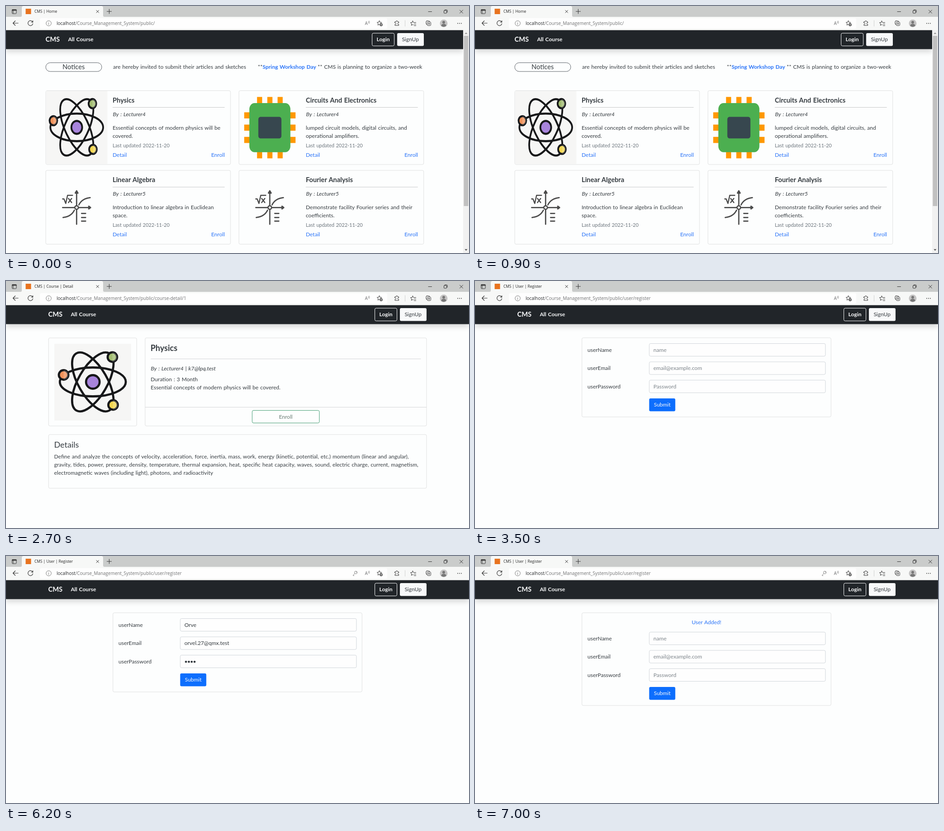
These frames come from a looping animation (1025x547 px, 8000 ms). An HTML page:

```html
<!DOCTYPE html>
<html lang="en">
<head>
<meta charset="utf-8">
<title>CMS</title>
<style>
html, body { margin: 0; height: 100%; overflow: hidden; background: #fdfefe; }
svg { display: block; width: 100%; height: 100%; }
text { font: 12.07px Lato, "Open Sans", sans-serif; word-spacing: .8px; fill: #363c41; white-space: pre; }
.ui { font: 9.95px "Open Sans", "Noto Sans", sans-serif; word-spacing: 0; fill: #6f7071; }
.tab { font-size: 8.4px; fill: #222; }
.b { font-weight: 700; }
.i { font-style: italic; font-size: 12.4px; }
.h { font-size: 14.7px; }
.big { font-size: 18px; }
.small { font-size: 11px; fill: #6c757d; }
.mute { fill: #7d848a; }
.link { fill: #2a74f8; }
.white { fill: #f8f9fa; }
.green { fill: #6a7d75; }
.mid { text-anchor: middle; }
.end { text-anchor: end; }
.line { fill: none; stroke: var(--ink, #333); stroke-linecap: round; stroke-linejoin: round; }
.card { fill: #fdfefe; stroke: #dfe0e0; }
.field { fill: #fefefe; stroke: #d0d5da; }
.rule { stroke: #c6c7c8; }
.nav { fill: #212529; filter: drop-shadow(0 6px 6px rgba(0,0,0,.15)); }
</style>
</head>
<body>
<svg id="stage" viewBox="0 0 1025 547"></svg>
<script>
const text = (x, y, s, cls = '') => `<text x="${x}" y="${y}" class="${cls}">${s}</text>`;
const box = (x, y, w, h, attrs = '') => `<rect x="${x}" y="${y}" width="${w}" height="${h}" ${attrs}/>`;
const card = (x, y, w, h) => box(x, y, w, h, 'rx="3" class="card"');
const path = (d, attrs = '') => `<path d="${d}" class="line" ${attrs}/>`;
const dot = (x, y, r, attrs = '') => `<circle cx="${x}" cy="${y}" r="${r}" ${attrs}/>`;
const group = (transform, s) => `<g transform="${transform}">${s}</g>`;

// Drawn in a 170 x 170 square
function atom() {
  const orbit = a => `<ellipse rx="73" ry="32" transform="translate(85.2 84.5) rotate(${a})"/>`;
  const ball = (x, y, r, c) => dot(x, y, r, `fill="${c}"`) +
    `<path d="M${x} ${y - r}a${r} ${r} 0 0 1 0 ${2 * r}z" fill="#fff" fill-opacity=".2" stroke="none"/>`;
  return box(0, 0, 170, 170, 'fill="#f6f6f5"') +
    `<g fill="none" stroke="#17181a" stroke-width="4.8">${[0, 60, -60].map(orbit).join('')}
    ${dot(85.2, 84.5, 15, 'fill="#a884dc"')}${ball(128.5, 29.5, 10.5, '#a3bd72')}
    ${ball(20.5, 69, 10.5, '#f0925a')}${ball(130, 135.5, 10.5, '#f2d650')}</g>`;
}

// Drawn in a 48 x 48 square
function chip() {
  const pins = [14, 22, 30].map(p => box(p, 4, 4, 40) + box(4, p, 40, 4)).join('');
  return `<g fill="#ff9800">${pins}</g>` + box(8, 8, 32, 32, 'rx="4" fill="#4caf50"') +
    box(15, 17, 18, 14, 'rx="1.6" fill="#37474f"');
}

// Origin at the crossing of the axes
function graph() {
  return '<g stroke-width="2.8" style="--ink:#4c4c4c">' +
    path('M0 37V-34M-31 0H28M5 -6Q12 -20 30 -22M-30 22Q-12 20 -5 6') +
    path('M-3 -32L0 -37L3 -32zM27 -3L31 0L27 3z') +
    path('M-31 -19H-28L-24 -9L-20 -27H-9M-18 -20L-11 -11M-11 -20L-18 -11', 'stroke-width="2.5"') +
    path('M11 13H20M11 22H20M11 30H20') + dot(0, 0, 4, 'class="line" style="fill:#fdfefe"') + '</g>';
}

function star(x, y, extra) {
  let d = '';
  for (let k = 0; k < 10; k++) {
    const a = k * Math.PI / 5, r = k % 2 ? 2.6 : 5.4;
    d += (k ? 'L' : 'M') + (r * Math.sin(a)).toFixed(1) + ' ' + (-r * Math.cos(a)).toFixed(1);
  }
  return group(`translate(${x} ${y})`, path(d + 'z') + extra);
}

function browser(title, url, key) {
  const keyIcon = `<g opacity=".65">${dot(774.5, 36.5, 3, 'class="line"')}
    ${path('M772 39L768.5 42.5V43.5H770.5')}${dot(775.5, 35.5, .7)}</g>`;
  return box(0, 0, 1025, 24, 'fill="#cacccb"') + box(0, 24, 1025, 29.3, 'fill="#f7f8f7"') +
    '<path d="M32 24q3 0 3-3V4q0-4 4-4H211q4 0 4 4V21q0 3 3 3z" fill="#f7f8f7"/>' +
    box(75, 27, 769, 23, 'rx="3" fill="#fefefe"') +
    box(43.5, 6, 12, 12, 'fill="#e8731f"') + text(63, 15.3, title, 'ui tab') +
    box(13.5, 8, 9.5, 9, 'rx="1.5" class="line"') + path('M14 9H22.5', 'stroke-width="2.4"') + path('M16 10V16') +
    path('M200 9.5L205.5 15M205.5 9.5L200 15M223.5 12H233.5M228.5 7V17') +
    path('M935 12.5H942.5M1004.5 9L1011.5 16M1011.5 9L1004.5 16') +
    box(969.5, 10, 6, 6, 'rx="1" class="line"') + path('M971.5 8.5H975.5Q977 8.5 977 10V14') +
    path('M27 38H15.5M20.5 33L15.5 38L20.5 43', 'stroke-width="1.2"') +
    path('M59 35.5A5.5 5.5 0 1 0 59.5 39M59.5 32.5V36H56', 'stroke-width="1.2"') +
    dot(94.5, 38.3, 5.7, 'fill="none" stroke="#777"') + path('M94.5 37.8V41M94.5 35.5V35.6', 'style="stroke:#777"') +
    text(112, 42, `<tspan fill="#26282a">localhost</tspan>/Course_Management_System/public/${url}`, 'ui') +
    (key ? keyIcon : '') +
    text(794.5, 42, 'A', 'ui') + path('M802 34Q803.5 36 802 38M804 33Q806 36 804 39', 'stroke-width=".8" style="stroke:#777"') +
    star(826.5, 38, dot(4, 3.5, 3.2, 'fill="#444"') + path('M2.3 3.5H5.7M4 1.8V5.2', 'style="stroke:#fff" stroke-width=".8"')) +
    path('M861 35H863.5A1.8 1.8 0 1 1 867 35H869.5V37.3A1.8 1.8 0 1 0 869.5 40.7V43H861V40.7A1.8 1.8 0 1 0 861 37.3z') +
    path('M883.5 32V45', 'style="stroke:#d0d0d0"') +
    star(900.5, 38.5, box(1.5, -3, 7, 9, 'fill="#f7f8f7"') + path('M2 -2H7M3 1.5H7M3 5H7')) +
    box(930, 33, 8, 8, 'rx="2" class="line"') + box(932.5, 35.5, 8, 8, 'rx="2" class="line" style="fill:#f7f8f7"') +
    path('M934.5 39.5H938.5M936.5 37.5V41.5') +
    dot(969, 38.5, 8.5, 'fill="#c5c4c4"') + dot(969, 36, 3, 'fill="#777"') +
    '<path d="M963.5 44q0-4.500 5.500-4.500t5.500 4.500q-5.500 4-11 0z" fill="#777"/>' +
    [1000, 1004, 1008].map(x => dot(x, 38.5, .9, 'fill="#333"')).join('');
}

function page(title, url, body, { key = false, width = 1025, shift = 6 } = {}) {
  const nav = text(87.5, 79, 'CMS', 'white h b') + text(137.5, 78.3, 'All Course', 'white b') +
    box(810.5, 60.2, 49, 28.2, 'rx="3" fill="none" stroke="#f8f9fa"') + text(835, 78.3, 'Login', 'white b mid') +
    box(866, 60, 59, 28.5, 'rx="3" fill="#f8f9fa"') + text(895.2, 78.3, 'SignUp', 'mid');
  return box(0, 0, 1025, 547, 'fill="#fdfefe"') + box(0, 53.3, width, 42.2, 'class="nav"') +
    group(`translate(${shift} 0)`, nav) + body + browser(title, url, key);
}

function course(x, y, name, teacher, lines, art) {
  return group(`translate(${x} ${y})`, card(0, 0, 409, 163.5) + art +
    text(148, 26, name, 'b h') + '<path d="M148 37H396" class="rule"/>' +
    text(148.5, 56.3, 'By : ' + teacher, 'i') +
    lines.map((s, k) => text(148, 86.3 + 18 * k, s)).join('') +
    text(148, 125.3, 'Last updated 2022-11-20', 'small') +
    text(148, 146.3, 'Detail', 'link') + text(396.5, 146.3, 'Enroll', 'link end'));
}

function home() {
  const curve = group('translate(68.3 82.3)', graph());
  const notices = box(88, 125.6, 124, 19.4, 'rx="9.7" fill="none" stroke="#5c6268"') + text(149.7, 140.3, 'Notices', 'h mid') +
    '<clipPath id="strip"><rect x="237" y="120" width="687.5" height="30"/></clipPath><g clip-path="url(#strip)">' +
    text(237, 138.5, 'are hereby invited to submit their articles and sketches') + text(557.5, 138.5, '**') +
    text(568, 138.5, 'Spring Workshop Day', 'b link') + text(690, 138.5, '** CMS is planning to organize a two-week s') + '</g>';
  const bar = box(1012, 53, 13, 494, 'fill="#f1f1f1"') + box(1013.5, 66, 10, 377, 'fill="#c1c1c1"') +
    '<path d="M1015.5 62h6l-3-3.5z" fill="#9a9a9a"/><path d="M1015.5 538.5h6l-3 3.5z" fill="#505050"/>';
  return notices +
    course(88, 187.5, 'Physics', 'Lecturer4', ['Essential concepts of modern physics will be', 'covered.'],
      group('translate(.5 .5) scale(.8 .956)', atom())) +
    course(515.7, 187.5, 'Circuits And Electronics', 'Lecturer4', ['lumped circuit models, digital circuits, and', 'operational amplifiers.'],
      group('translate(.3 .3) scale(2.84 3.4)', chip())) +
    course(88, 364, 'Linear Algebra', 'Lecturer5', ['Introduction to linear algebra in Euclidean', 'space.'], curve) +
    course(515.7, 364, 'Fourier Analysis', 'Lecturer5', ['Demonstrate facility Fourier series and their', 'coefficients.'], curve) + bar;
}

function detail() {
  const about = [
    'Define and analyze the concepts of velocity, acceleration, force, inertia, mass, work, energy (kinetic, potential, etc.) momentum (linear and angular),',
    'gravity, tides, power, pressure, density, temperature, thermal expansion, heat, specific heat capacity, waves, sound, electric charge, current, magnetism,',
    'electromagnetic waves (including light), photons, and radioactivity'];
  return card(94.3, 126, 195, 195) + group('translate(107 139)', atom()) + card(308, 126, 623, 195) +
    text(320, 155.2, 'Physics', 'b big') + '<path d="M320.5 172.5H918.5M308 279.5H931" class="rule" style="stroke:#d4d5d6"/>' +
    text(320.5, 198, 'By : Lecturer4 | k7@lpq.test', 'i') + text(320.3, 222, 'Duration : 3 Month') +
    text(320.3, 240, 'Essential concepts of modern physics will be covered.') +
    box(545, 286.6, 148.7, 27.8, 'rx="3" fill="#fefefe" stroke="#3f9a70"') + text(619.3, 304.7, 'Enroll', 'green mid') +
    card(94.3, 340, 836.7, 119) + text(106.5, 369.3, 'Details', 'big') +
    about.map((s, k) => text(106.5, 393.3 + 18 * k, s)).join('');
}

function form(values, message = '') {
  const top = message ? 30 : 0;
  const names = ['userName', 'userEmail', 'userPassword'];
  const hints = ['name', 'email@example.com', 'Password'];
  const bullets = [398.4, 404.8, 411.1, 417.4].map(x => dot(x, 234.2, 2.3, 'fill="#30363b"')).join('');
  const rows = names.map((s, k) => {
    const y = 40.5 * k;
    const value = !values ? text(395, 156.5 + y, hints[k], 'mute') : k < 2 ? text(395, 156.5 + y, values[k]) : bullets;
    return text(249, 156.5 + y, s) + box(385.8, 138.5 + y, 390, 28, 'rx="3" class="field"') + value;
  }).join('');
  return card(236.7, 125.8, 551.5, 175.2 + top) + text(512.5, 151, message, 'link mid') +
    group(`translate(0 ${top})`, rows + box(385.6, 260, 57.8, 28.5, 'rx="3" fill="#0d6efd"') + text(414.5, 278.3, 'Submit', 'white mid'));
}

const register = (body, key) => page('CMS | User | Register', 'user/register', body, { key });
const scenes = [
  [0, page('CMS | Home', '', home(), { width: 1012, shift: 0 })],
  [1500, page('CMS | Course | Detail', 'course-detail/1', detail())],
  [3500, register(form(), false)],
  [5000, register(form(['Orve', 'orvel.27@qmx.test']), true)],
  [7000, register(form(null, 'User Added!'), true)]
];

const stage = document.getElementById('stage');
let shown;
function draw(now) {
  const scene = scenes.findLast(([start]) => start <= now % 8000);
  if (scene !== shown) {
    stage.innerHTML = scene[1];
    shown = scene;
  }
  requestAnimationFrame(draw);
}
draw(performance.now());
</script>
</body>
</html>
```
